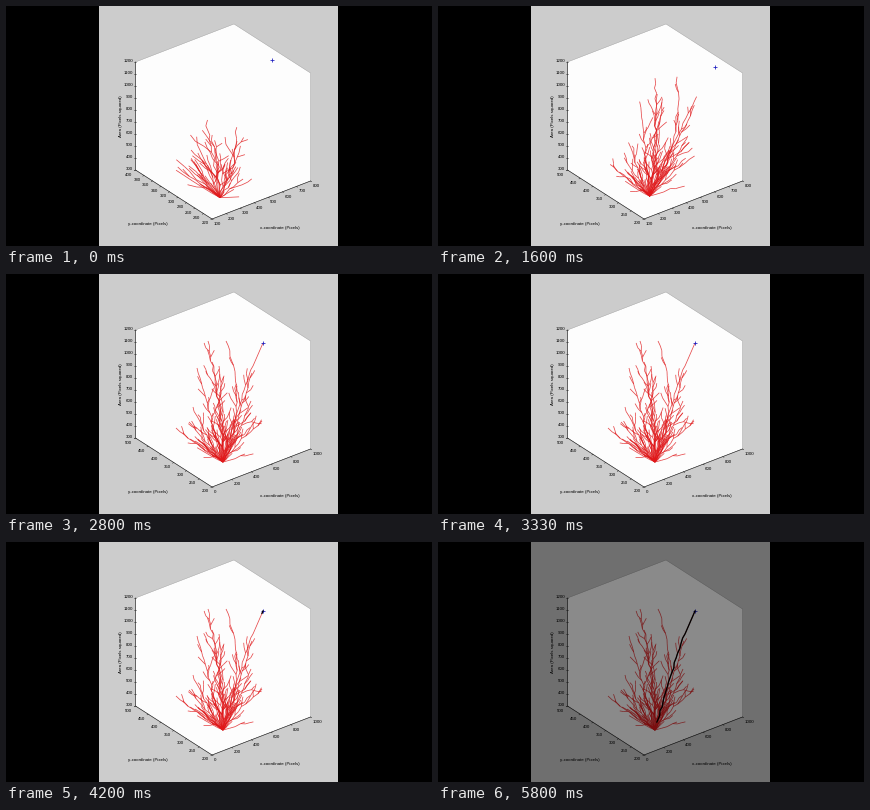
A matplotlib script that plays this animation: 426x240 px, repeating every 5.87 s.

```python
import numpy as np
import matplotlib.pyplot as plt
from matplotlib.animation import FuncAnimation
from matplotlib.collections import LineCollection

W, H, DPI = 426, 240, 100
LOOP, FRAMES = 5870, 88
PX = 72 / DPI                       # one pixel in points

# Axes box on screen: near corner and the three edge vectors
ORIGIN = np.array([206.0, 213.0])
EX, EY, EZ = np.array([[98.5, -38.0], [-76.5, -49.0], [0.0, -108.0]])
X_RANGES = [(100, 800, 100), (0, 1000, 200)]
Y_RANGES = [(220, 400, 20), (200, 500, 50)]
Y_RESCALE, X_RESCALE = 400, 1870    # ms at which the limits widen
GROW_FROM, GROW_TO = -1800, 1750    # ms over which every stem grows

ROOT, GOAL = np.array([217.0, 188.0]), np.array([257.0, 69.0])
LEAD = (247, 92, -2)                # stem that ends next to the goal
# Stem tips on screen, each with its sideways bow
STEMS = [(202, 67, 4), (220, 67, 24), (191, 94, 0), (206, 88, 6),
         (213, 92, 3), (187, 133, -3), (183, 148, 0), (170, 154, -2),
         (256, 147, -4), (245, 127, 4), (246, 99, 2), (239, 180, 2)]

rng = np.random.default_rng(5)
segs, births = [], []


def project(p, xr, yr):
    u = (p[..., 0] - xr[0]) / (xr[1] - xr[0])
    v = (p[..., 1] - yr[0]) / (yr[1] - yr[0])
    w = (p[..., 2] - 300) / 900
    return ORIGIN + u[..., None] * EX + v[..., None] * EY + w[..., None] * EZ


def lift(s):
    """Data coordinates of points seen on screen with the widest limits."""
    s = np.asarray(s, float)
    d, h = s[..., 0] - ROOT[0], (ROOT[1] - s[..., 1]) / 118
    u = 0.205 + 0.5 * h + np.where(d > 0, 0.0025, 0.001) * d
    v = (ORIGIN[0] + EX[0] * u - s[..., 0]) / -EY[0]
    w = (ORIGIN[1] + EX[1] * u + EY[1] * v - s[..., 1]) / -EZ[1]
    return np.stack([1000 * u, 200 + 300 * v, 300 + 900 * w], -1)


def grow(start, tip, bend, t0, t1, step=5, jitter=0.6):
    """Add a jittered quadratic curve, one piece after the other."""
    start, tip = np.asarray(start, float), np.asarray(tip, float)
    n = max(2, int(np.hypot(*(tip - start)) / step))
    s = np.linspace(0, 1, n + 1)[:, None]
    nodes = start + (tip - start) * s + 2 * s * (1 - s) * np.asarray(bend)
    nodes[1:-1] += rng.normal(0, jitter, (n - 1, 2))
    times = np.linspace(t0, t1, n + 1)
    segs.extend(zip(nodes[:-1], nodes[1:]))
    births.extend(times[1:])
    return nodes, times


def sprout(nodes, times, chance):
    """Side shoots that leave a stem and bend back along it."""
    n = len(nodes) - 1
    for k in range(2, n):
        left_over = 1 - k / n
        if rng.random() > chance * (0.35 + left_over):
            continue
        d = nodes[k] - nodes[k - 1]
        d /= np.hypot(*d)
        side = rng.choice([-1, 1]) * np.array([-d[1], d[0]])
        size = rng.uniform(5, 11) + rng.uniform(0, 14) * left_over
        tip = nodes[k] + size * (d + rng.uniform(0.2, 0.6) * side)
        t = min(times[k] + rng.exponential(600), 3700)
        shoot = grow(nodes[k], tip, side * size * 0.12, t, t + 30 * size, 4, 0.4)
        sprout(*shoot, chance * 0.4)


def stem(x, y, bow):
    nodes, times = grow(ROOT, (x, y), (bow, 0), GROW_FROM, GROW_TO)
    sprout(nodes, times, 0.7)
    return nodes


route = np.vstack([stem(*LEAD), GOAL])[::-1]
grow(LEAD[:2], GOAL, (0, 0), 1900, 2100, jitter=0)
for spec in STEMS:
    stem(*spec)

# Fan of short shoots around the root
for _ in range(30):
    a, size = np.radians(rng.uniform(-62, 48)), rng.uniform(12, 42)
    t = rng.uniform(-1500, 1500)
    grow(ROOT, ROOT + size * np.array([np.sin(a), -np.cos(a)]), (0, 0), t, t + 500)

tree, births, goal = lift(segs), np.array(births), lift(GOAL)

# Stage
fig = plt.figure(figsize=(W / DPI, H / DPI), dpi=DPI, facecolor="black")
ax = fig.add_axes([0, 0, 1, 1])
ax.set(xlim=(0, W), ylim=(H, 0))
ax.axis("off")
ax.add_patch(plt.Rectangle((93, 0), 239, H, fc="#cccccc", lw=0))

left, near, right = ORIGIN + EY, ORIGIN, ORIGIN + EX
outline = np.array([left, near, right, right + EZ, right + EY + EZ, left + EZ])
ax.add_patch(plt.Polygon(outline, fc="#fdfdfd", ec="#999999", lw=0.4 * PX))


def line(pts, width=0.5):
    return ax.plot(*np.transpose(pts), color="#222222", lw=width * PX)


def label(x, y, s, **kw):
    opts = dict(ha="center", va="center", fontsize=4.4 * PX,
                family="Liberation Sans", color="black")
    return ax.text(x, y, s, **{**opts, **kw})


def ticks(lim, edge, shift, ha):
    lo, hi, step = lim
    out = []
    for val in range(lo, hi + 1, step):
        p = ORIGIN + edge * (val - lo) / (hi - lo)
        out.append(label(*(p + shift), str(val), ha=ha))
        out += line([p, p + np.sign(shift) * [1.2, 0.7]])
    return out


line([left + EZ, left, near, right], 0.6)
x_ticks = [ticks(r, EX, (2, 5), "left") for r in X_RANGES]
y_ticks = [ticks(r, EY, (-3, 4.5), "right") for r in Y_RANGES]
for k in range(10):
    y = left[1] - 12 * k
    label(127, y - 1, str(300 + 100 * k), ha="right")
    line([(128, y), (130, y)])
label(115, 110, "Area (Pixels squared)", rotation=90)
label(142, 218.5, "y-coordinate (Pixels)")
label(274, 221.5, "x-coordinate (Pixels)")

edges = LineCollection([], colors="#e0181a", linewidths=0.75 * PX, alpha=0.8, zorder=3)
ax.add_collection(edges)
star, = ax.plot([], [], "+", ms=4 * PX, mew=0.8 * PX, color="#2020c0", zorder=4)
trace, = ax.plot([], [], color="black", lw=1.3 * PX, zorder=5)
shade = plt.Rectangle((0, 0), W, H, fc="black", lw=0, alpha=0, zorder=10)
ax.add_patch(shade)

walked = np.r_[0, np.cumsum(np.hypot(*np.diff(route, axis=0).T))]


def draw(i):
    t = i * LOOP / FRAMES
    xi, yi = int(t >= X_RESCALE), int(t >= Y_RESCALE)
    for sets, cur in ((x_ticks, xi), (y_ticks, yi)):
        for k, group in enumerate(sets):
            for art in group:
                art.set_visible(k == cur)

    limits = X_RANGES[xi], Y_RANGES[yi]
    edges.set_segments(project(tree[births <= t], *limits))
    star.set_data(*project(goal, *limits)[:, None])

    done = np.clip((t - 4100) / 1750, 0, 1) * walked[-1]
    s = np.linspace(0, done, 80 if done else 0)
    trace.set_data(*(np.interp(s, walked, c) for c in route.T))
    shade.set_alpha(float(np.clip((t - 5350) / 850, 0, 1)))
    return [edges, star, trace, shade]


anim = FuncAnimation(fig, draw, frames=FRAMES, interval=LOOP / FRAMES,
                     repeat=True, repeat_delay=0, blit=False)
plt.show()
```
